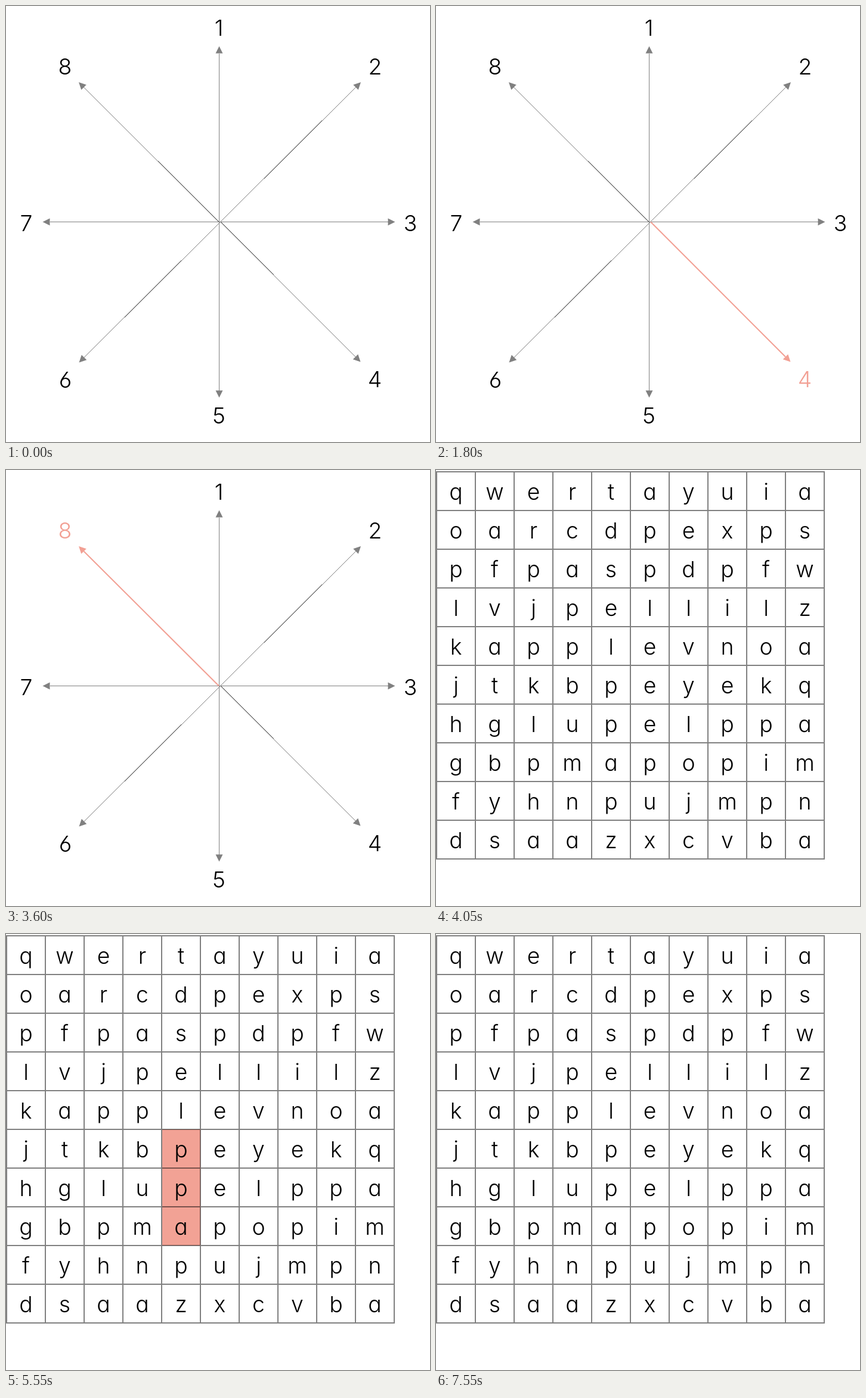
Animation, 711 px wide and 732 px high, one loop 8 s. Source, as an HTML page:

```html
<!DOCTYPE html>
<html lang="en">
<head>
<meta charset="utf-8">
<title>Word search directions</title>
<style>
html, body { margin: 0; width: 100%; height: 100%; overflow: hidden; background: #fff; }
svg { display: block; width: 100vw; height: 100vh; }
text {
  font: 300 37.33px Inter, Lato, sans-serif;
  font-feature-settings: "cv11", "cv03";
  text-anchor: middle;
}
.ray { color: #808080; }
.ray line { stroke: currentColor; stroke-width: 1; shape-rendering: crispEdges; }
.ray path { fill: currentColor; }
.ray.on { color: #f2a094; }
.ray.on line { stroke-width: 2; shape-rendering: auto; }
.ray.on text { fill: currentColor; }
.rule { fill: none; stroke: #808080; stroke-width: 2; shape-rendering: crispEdges; }
.mark { fill: #f2a295; mix-blend-mode: multiply; }
</style>
</head>
<body>
<svg viewBox="0 0 711 732">
  <rect width="711" height="732" fill="#fff"/>
  <g id="star"></g>
  <g id="grid"></g>
</svg>
<script>
const NS = "http://www.w3.org/2000/svg";
const LOOP = 8000, RAY_STEP = 450, GRID_AT = 4050, CELL_STEP = 500;
const CELL = 65;
const star = document.getElementById("star");
const grid = document.getElementById("grid");

function add(parent, tag, attrs, text) {
  const el = document.createElementNS(NS, tag);
  for (const key in attrs) el.setAttribute(key, attrs[key]);
  if (text) el.textContent = text;
  parent.appendChild(el);
  return el;
}

// Each ray: start x, start y, tip x, tip y, label x, label baseline
const rays = [
  [357.5, 362.5, 357.5, 67.5, 357, 49.5],
  [359, 363, 595, 128, 619, 115],
  [357.5, 362.5, 652.5, 362.5, 678, 378],
  [360, 362.5, 594.5, 597.5, 618.5, 639.5],
  [357.5, 362.5, 357.5, 657.5, 357, 701],
  [359, 363, 122.5, 598.5, 99.5, 640.5],
  [357.5, 362.5, 61.5, 362.5, 34, 378],
  [357, 362.5, 122, 128, 99, 115]
].map(([x1, y1, x2, y2, tx, ty], i) => {
  const g = add(star, "g", { class: "ray" });
  const len = Math.hypot(x2 - x1, y2 - y1);
  const ux = (x2 - x1) / len, uy = (y2 - y1) / len;
  const bx = x2 - ux * 12, by = y2 - uy * 12;
  add(g, "line", { x1, y1, x2: bx, y2: by });
  add(g, "path", {
    d: `M${x2} ${y2}L${bx - uy * 6} ${by + ux * 6}L${bx + uy * 6} ${by - ux * 6}Z`
  });
  add(g, "text", { x: tx, y: ty }, String(i + 1));
  return g;
});

const rows = [
  "qwertayuia", "oarcdpexps", "pfpaspdpfw", "lvjpellilz", "kapplevnoa",
  "jtkbpeyekq", "hglupelppa", "gbpmapopim", "fyhnpujmpn", "dsaazxcvba"
];
let rules = "";
for (let i = 0; i <= 10; i++) {
  rules += `M0 ${3 + i * CELL}H652M${1 + i * CELL} 2V654`;
}
add(grid, "path", { class: "rule", d: rules });
rows.forEach((row, r) => [...row].forEach((ch, c) =>
  add(grid, "text", { x: 33.5 + c * CELL, y: 50 + r * CELL }, ch)));

// The word is marked from the bottom cell upwards
const marks = [7, 6, 5, 4, 3].map(r =>
  add(grid, "rect", { class: "mark", x: 262, y: 3 + r * CELL, width: 64, height: CELL }));
const arrow = add(grid, "path", {
  fill: "#fff", d: "M273.5 218L281 233H276V513H271V233H266Z"
});

function show(el, on) {
  el.style.display = on ? "" : "none";
}

function draw(t) {
  const inGrid = t >= GRID_AT;
  show(star, !inGrid);
  show(grid, inGrid);
  const active = Math.floor(t / RAY_STEP) - 1;
  rays.forEach((g, i) => g.classList.toggle("on", i === active));
  const step = Math.floor((t - GRID_AT) / CELL_STEP);
  marks.forEach((m, i) => show(m, step > i && step < 7));
  show(arrow, step === 6);
}

const start = performance.now();
function tick() {
  draw((performance.now() - start) % LOOP);
  requestAnimationFrame(tick);
}
draw(0);
requestAnimationFrame(tick);
</script>
</body>
</html>
```
